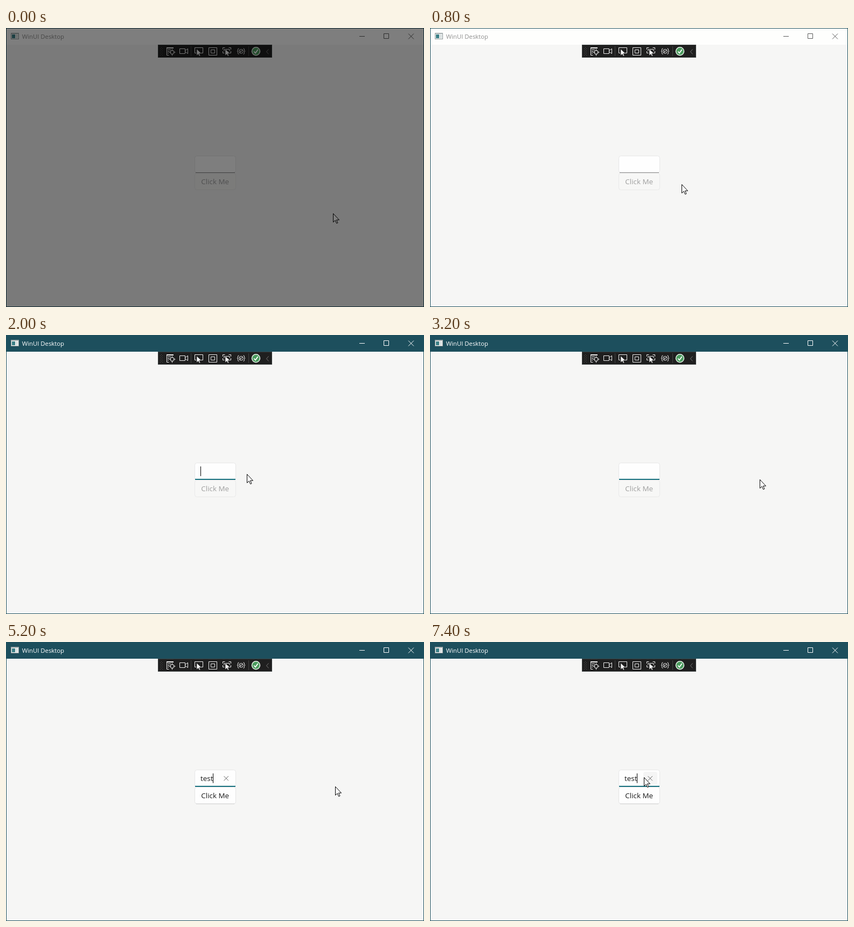
These frames come from a looping animation (776 by 518 pixels, 8000 ms). An HTML page:

```html
<!DOCTYPE html>
<html lang="en">
<head>
<meta charset="utf-8">
<title>WinUI Desktop</title>
<style>
  html, body { margin: 0; width: 100%; height: 100%; overflow: hidden; background: #f6f6f5; }
  svg { display: block; width: 100vw; height: 100vh; }
  text { font-family: "Open Sans", "Noto Sans", sans-serif; font-size: 13.4px; white-space: pre; }
  .line { fill: none; stroke: #f0f0f0; }
</style>
</head>
<body>
<svg viewBox="0 0 776 518">
  <defs>
    <path id="pick" d="M0 0v12l3-2.6 1.9 3.9 1.8-.9-1.8-3.8h4z" fill="#f4f4f4" stroke="#1f1f1f" stroke-width=".6"/>
    <pattern id="grip" width="4" height="4" patternUnits="userSpaceOnUse">
      <path d="M0 0h1v1h-1zM2 2h1v1h-1z" fill="#555"/>
    </pattern>
  </defs>

  <rect width="776" height="518" fill="#f6f6f5"/>
  <rect id="bar" width="776" height="31"/>
  <rect x=".5" y=".5" width="775" height="517" fill="none" stroke="#1d4f5d"/>

  <g id="appIcon">
    <rect x="9.5" y="9.5" width="14" height="11" fill="#f4f6f6" stroke="#8d9798"/>
    <path d="M9 9h15v2h-15z" fill="#a4adae"/>
    <path d="M11 12h6v7h-6z" fill="#3b7f86"/>
    <path d="M18 12h4v7h-4z" fill="#d9e0e0"/>
  </g>
  <text id="title" x="29.8" y="20" style="font-size:11.3px">WinUI Desktop</text>
  <path id="controls" fill="none" d="M656 15.5h10M701.5 10.5h9v9h-9zM747 10.5l10 10M757 10.5l-10 10"/>

  <g id="toolbar">
    <rect x="282.5" y="31.5" width="211" height="23" fill="#1f1f1f" stroke="#3b3f3f"/>
    <rect x="285" y="35" width="7" height="17" fill="url(#grip)"/>
    <path d="M343.5 34v18M450.5 34v18" stroke="#444"/>
    <g class="line">
      <path d="M298 36.5h13M298.500 36v14.500h4M300 40.500h6M300 43.500h3M300 46.500h2"/>
      <path d="M298 37.500h13"/>
      <circle cx="308.500" cy="45" r="3.700"/>
      <path d="M308.500 39.500v3M308.500 47.500v4M302.500 45h4M310.500 45h4"/>
      <path d="M322.500 38.500h10v9h-10zM332.500 42l5-3.500v9l-5-3.500"/>
      <path d="M353 46.500h-2.500v-10h15v10h-4"/>
      <path d="M376.500 36.500h15v14h-15zM380.500 40.500h7v6h-7z"/>
      <path d="M402.500 40v-3.500h4M413.500 36.500h4v3.500M402.500 43v3.500h3M417.500 43v3.500h-3M405 43v-3.500h10v3.500"/>
      <path d="M432.500 38q-2 0-2 2v1.500q0 1.500-1.500 1.500 1.500 0 1.500 1.500v2q0 2 2 2M440.500 38q2 0 2 2v1.500q0 1.500 1.500 1.500-1.500 0-1.500 1.500v2q0 2-2 2"/>
      <circle cx="436.500" cy="43.300" r="3.800"/>
      <path d="M433.800 46l5.400-5.400M434.500 42l2 2.500"/>
    </g>
    <use href="#pick" x="354" y="39"/>
    <use href="#pick" x="407" y="39"/>
    <circle cx="464" cy="43.300" r="8.200" fill="#e9f3ea"/>
    <circle cx="464" cy="43.300" r="6.700" fill="#4a9b5d"/>
    <path d="M460.300 43.500l2.700 3 4.700-6.500" fill="none" stroke="#fff" stroke-width="1.800"/>
    <path d="M487.500 39.500l-4 4.500 4 4.500" fill="none" stroke="#777"/>
  </g>

  <rect id="box" x="350.5" y="237.5" width="76" height="31" rx="4" stroke="#e7e7e7"/>
  <path id="under" fill="none"/>
  <text id="entry" x="361" y="258" fill="#1a1a1a"></text>
  <g id="clear">
    <rect id="clearBack" x="396" y="241" width="26" height="24" rx="4" fill="#f5f5f5"/>
    <path d="M404.500 249l8.500 8.500M413 249l-8.500 8.500" stroke="#666"/>
  </g>
  <path id="caret" d="M.5 244v18" stroke="#000"/>

  <rect id="button" x="350.5" y="269.5" width="76" height="31" rx="4"/>
  <path id="edge" d="M353 300.500h71" stroke="#cbcbcb"/>
  <text id="label" x="388.2" y="290" text-anchor="middle">Click Me</text>

  <path id="arrow" d="M.5.5v16l3.700-3.400 2.500 5.600 2.300-1-2.500-5.400h5z" fill="#fff" stroke="#000"/>
  <path id="beam" d="M-3 -7.500h2.500l.5.500.5-.5h2.500M-3 7.500h2.500l.5-.5.5.5h2.500M0 -7v14" fill="none" stroke="#000"/>
  <rect id="dim" width="776" height="518" opacity=".5"/>
</svg>
<script>
const LOOP = 8000, STEP = 200;
const ui = {};
document.querySelectorAll('[id]').forEach(el => ui[el.id] = el);

// Pointer stops: time, x, y
const stops = [
  [200, 607, 344], [1200, 391, 261], [1600, 389, 254], [1800, 389, 254],
  [2400, 612, 268], [5000, 612, 268], [5200, 611, 268], [5800, 402, 285],
  [6200, 401, 286], [6800, 397, 253], [7400, 397, 251]
];

const set = (el, attrs) => { for (const k in attrs) el.setAttribute(k, attrs[k]); };
const show = (el, on) => set(el, { visibility: on ? 'visible' : 'hidden' });
const ease = p => p * p * (3 - 2 * p);
const inside = ([x, y], l, t, r, b) => x >= l && x < r && y >= t && y < b;

function pointer(t) {
  const i = stops.findIndex(s => s[0] > t);
  if (i === 0) return stops[0].slice(1);
  if (i < 0) return stops[stops.length - 1].slice(1);
  const [t0, x0, y0] = stops[i - 1], [t1, x1, y1] = stops[i];
  const p = ease((t - t0) / (t1 - t0));
  return [Math.round(x0 + (x1 - x0) * p), Math.round(y0 + (y1 - y0) * p)];
}

function draw(t) {
  const at = pointer(t);
  const active = t >= 1800;
  const focus = active && t < 6000 || t >= 7000;
  const typed = Math.max(0, Math.min(4, (t - 3200) / STEP));
  const enabled = typed > 0;
  const pressed = t === 6000;
  const overBox = inside(at, 351, 237, 427, 269);
  const overButton = enabled && inside(at, 351, 269, 427, 301);
  const canClear = focus && enabled;
  const overClear = canClear && inside(at, 396, 241, 422, 265);
  const useBeam = overBox && !overClear;

  show(ui.dim, t < 200);
  set(ui.bar, { fill: active ? '#1d4f5d' : '#fefefd' });
  set(ui.title, { fill: active ? '#fff' : '#8f8f8f' });
  set(ui.controls, { stroke: active ? '#fff' : '#5a5a5a' });

  set(ui.box, { fill: overBox && !focus ? '#f9f9fc' : '#fefefe' });
  set(ui.under, focus
    ? { d: 'M351 268h75', stroke: '#17717f', 'stroke-width': 2 }
    : { d: 'M352 268.500h73', stroke: '#868686', 'stroke-width': 1 });
  ui.entry.textContent = 'test'.slice(0, typed);
  show(ui.clear, canClear);
  show(ui.clearBack, overClear);
  show(ui.caret, focus && t !== 3200);
  const end = typed ? ui.entry.getComputedTextLength() : 0;
  set(ui.caret, { transform: `translate(${Math.round(360.800 + end)} 0)` });

  set(ui.button, {
    fill: !enabled ? '#f7f7f6' : pressed ? '#f6f6f7' : overButton ? '#f9f9fc' : '#fefefe',
    stroke: enabled ? '#e4e4e4' : '#e9e9e9'
  });
  show(ui.edge, enabled && !pressed);
  set(ui.label, { fill: !enabled ? '#9f9f9f' : pressed ? '#5e5e5e' : '#1a1a1a' });

  show(ui.arrow, !useBeam);
  show(ui.beam, useBeam);
  set(ui.arrow, { transform: `translate(${at})` });
  set(ui.beam, { transform: `translate(${at[0] + .5} ${at[1]})` });
}

const start = performance.now();
function tick() {
  const t = (performance.now() - start) % LOOP;
  draw(Math.floor(t / STEP) * STEP);
  requestAnimationFrame(tick);
}
tick();
</script>
</body>
</html>
```
